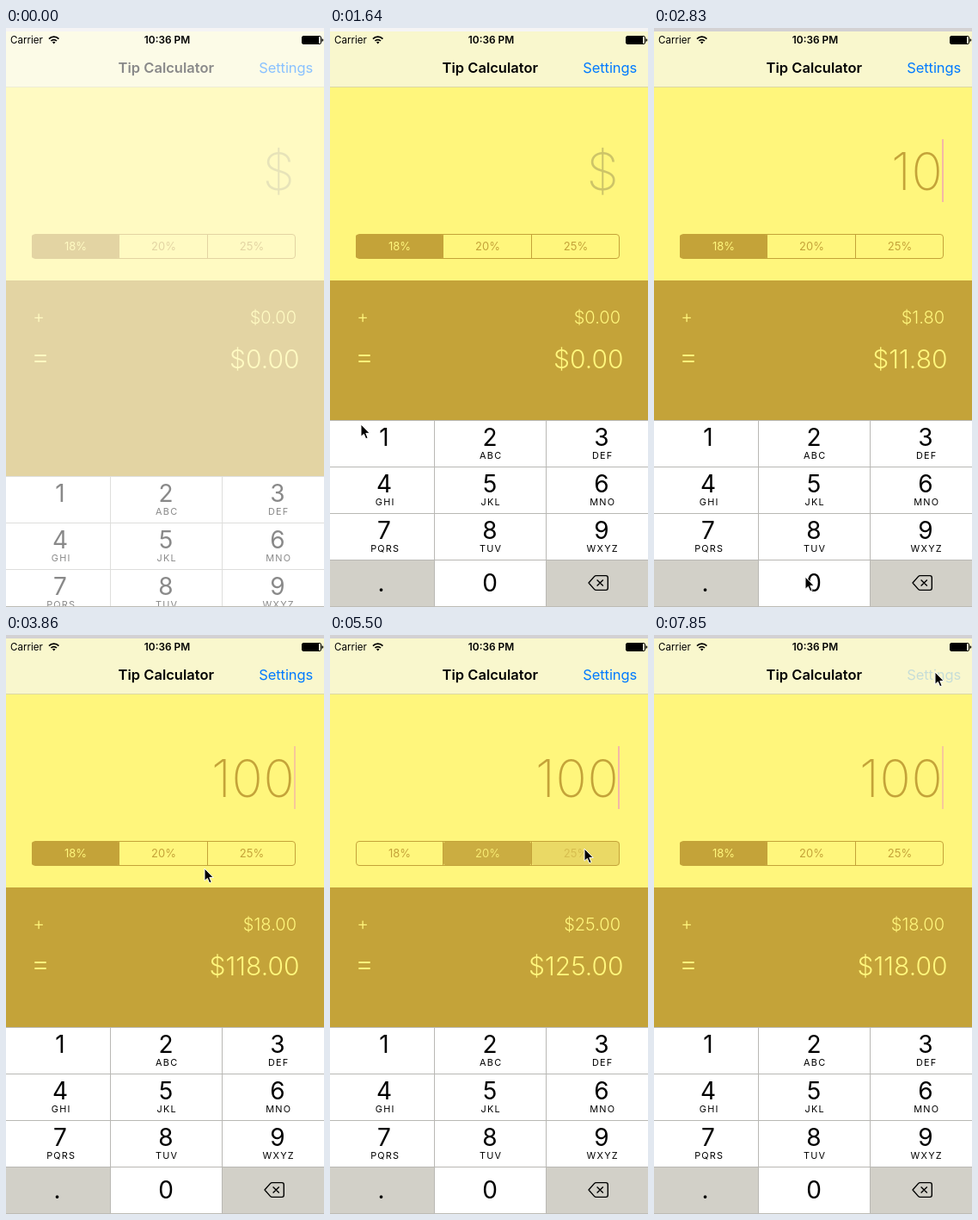
Animation, 370 px wide and 672 px high, one loop 8000 ms. Source, as an HTML page:

```html
<!DOCTYPE html>
<html lang="en">
<head>
<meta charset="utf-8">
<title>Tip Calculator</title>
<style>
  html, body { margin: 0; width: 100%; height: 100%; overflow: hidden; background: #fff; }
  svg { display: block; width: 370px; height: 672px; font-family: Inter, Roboto, "Liberation Sans", sans-serif; }
</style>
</head>
<body>
<svg viewBox="0 0 370 672">
  <g id="app">
    <rect y="4" width="370" height="64" fill="#f9f7cd"/>
    <rect y="68" width="370" height="1" fill="#dcd8a4"/>
    <rect y="69" width="370" height="224" fill="#fff67c"/>
    <rect y="293" width="370" height="379" fill="#c4a339"/>
    <g id="labels"></g>
    <g id="segments"></g>
    <rect id="caret" x="335" y="129" width="2" height="73" fill="#f4b8a6"/>
    <g id="keypad"></g>
  </g>
  <rect y="671" width="370" height="1" fill="#bdbbb5"/>
  <rect id="chrome" width="370" height="4"/>
  <g id="status">
    <g fill="none" stroke="#000" stroke-width="1.7">
      <path d="M50 12.6a7.6 7.6 0 0 1 11.4 0"/>
      <path d="M52.4 15a4.6 4.6 0 0 1 6.6 0"/>
    </g>
    <path d="M53.9 16.6a2.6 2.6 0 0 1 3.6 0L55.7 18.6z"/>
    <rect x="344.5" y="9.5" width="22" height="9" rx="1.5" fill="none" stroke="#000"/>
    <rect x="345" y="10" width="19" height="8"/>
    <path d="M367.5 12.3a1.8 1.8 0 0 1 0 3.6z"/>
  </g>
  <path id="mouse" d="M0 0V14.2L3.4 11.4L5.7 16.8L8.1 15.7L5.8 10.4H10.2z" fill="#000" stroke="#fff"/>
</svg>
<script>
const TICK = 148, LOOP = 8000, LAST = 53 * TICK;
const BROWN = '#c4a339', YELLOW = '#fff67c', GRAY = '#d2d0c8';
const $ = id => document.getElementById(id);
const clamp = v => Math.max(0, Math.min(1, v));
const ease = v => v * v * (3 - 2 * v);
const money = v => '$' + v.toFixed(2);

function add(parent, tag, attrs, content = '') {
  const el = document.createElementNS('http://www.w3.org/2000/svg', tag);
  for (const name in attrs) el.setAttribute(name, attrs[name]);
  el.textContent = content;
  parent.appendChild(el);
  return el;
}

function text(parent, content, x, y, size, weight, fill, anchor = 'middle', spacing = 0) {
  return add(parent, 'text', {
    x, y, fill, 'font-size': size, 'font-weight': weight,
    'text-anchor': anchor, 'letter-spacing': spacing
  }, content);
}

// Status bar, navigation bar and amounts
text($('status'), 'Carrier', 5, 18.4, 11.6, 400, '#000', 'start');
text($('status'), '10:36 PM', 187.5, 18.4, 11.9, 600, '#000');
const labels = $('labels');
text(labels, 'Tip Calculator', 186.3, 52, 16.5, 600, '#000');
const settings = text(labels, 'Settings', 357.2, 52, 16.5, 400, '#007aff', 'end', -0.08);
const amount = text(labels, '$', 336.5, 188, 60, 150, BROWN, 'end', 0.7);
text(labels, '+', 38, 342, 21, 300, YELLOW);
text(labels, '=', 40, 393, 33, 300, YELLOW);
const tip = text(labels, '', 338, 343, 20, 300, YELLOW, 'end');
const total = text(labels, '', 341.5, 395, 30, 300, YELLOW, 'end');

// Segmented control
const segs = [18, 20, 25].map((rate, i) => {
  const x = Math.round(30 + 102.3 * i), mid = 81 + 102.5 * i, box = $('segments');
  const seg = {
    rate,
    fill: add(box, 'rect', { x, y: 240, width: 102, height: 27, rx: 2, fill: BROWN }),
    off: text(box, rate + '%', mid, 258, 13, 400, BROWN),
    on: text(box, rate + '%', mid, 258, 13, 400, YELLOW)
  };
  if (i) add(box, 'path', { d: `M${x - .5} 239.5v28`, stroke: BROWN });
  return seg;
});
add($('segments'), 'rect', {
  x: 30.5, y: 239.5, width: 306, height: 28, rx: 3.5, fill: 'none', stroke: BROWN
});

// Keypad, drawn from its own top edge
const keypad = $('keypad'), keyBack = {};
const edges = [0, 122, 252, 371], mids = [63, 186, 316];
const letters = ['', 'ABC', 'DEF', 'GHI', 'JKL', 'MNO', 'PQRS', 'TUV', 'WXYZ'];
add(keypad, 'rect', { width: 370, height: 230, fill: '#b9b8b4' });
[...'123456789.0<'].forEach((name, i) => {
  const col = i % 3, y = 54 * Math.floor(i / 3), x = edges[col], mid = mids[col];
  keyBack[name] = add(keypad, 'rect', {
    x, y: y + 1, width: edges[col + 1] - x - 1, height: 53, fill: '.<'.includes(name) ? GRAY : '#fff'
  });
  if (name === '<') {
    add(keypad, 'path', {
      d: 'M301 189L307.5 181.6Q308.4 180.6 309.8 180.6H321Q323.3 180.6 323.3 182.9V195.1Q323.3 197.4 321 197.4H309.8Q308.4 197.4 307.5 196.4ZM310.6 185.4L317.8 192.6M317.8 185.4L310.6 192.6',
      fill: 'none', stroke: '#000', 'stroke-width': 1.4, 'stroke-linejoin': 'round'
    });
    return;
  }
  text(keypad, name, name === '.' ? 59.5 : mid, y + (i < 9 ? 30 : 37), 28, 400, '#000');
  if (letters[i]) text(keypad, letters[i], mid + 1.2, y + 45, 10.9, 400, '#000', 'middle', 1.2);
});

// What the user does, in ms
const taps = [{ key: '1', at: 2072 }, { key: '0', at: 2812 }, { key: '0', at: 3404 }];
const picks = [{ seg: 0, at: -LOOP }, { seg: 1, at: 4440 }, { seg: 2, at: 5476 }, { seg: 0, at: 6808 }];
const stops = [
  { x: -40, y: 470, from: 0, to: 0 },
  { x: 36, y: 460, from: 1180, to: 1628 },
  { x: 176, y: 637, from: 2220, to: 2664 },
  { x: 231, y: 271, from: 3404, to: 3848 },
  { x: 186, y: 251, from: 3848, to: 4292 },
  { x: 296, y: 248, from: 4736, to: 5180 },
  { x: 86, y: 250, from: 5772, to: 6512 },
  { x: 327, y: 43, from: 6956, to: 7548 }
];

function mouseAt(t) {
  let { x, y } = stops[0];
  for (const s of stops) {
    const k = s.to > s.from ? ease(clamp((t - s.from) / (s.to - s.from))) : 1;
    x += (s.x - x) * k;
    y += (s.y - y) * k;
  }
  return [x, y];
}

// The caret blinks once a second, counted from the latest key
function caretAt(t, since) {
  if (t < since) return 0;
  const p = (t - since) % 1000;
  return Math.max(clamp((560 - p) / 160), clamp((p - 850) / 150));
}

function paintSegments(t, done) {
  const now = done[done.length - 1], before = done[done.length - 2];
  const fading = t - now.at < TICK;
  segs.forEach((s, i) => {
    let fill = i === now.seg ? 1 : 0, on = fill, off = 1 - fill;
    if (fading && i === now.seg) { fill = .35; on = 0; off = .5; }
    if (fading && i === before.seg) { fill = .88; on = .85; off = 0; }
    s.fill.setAttribute('opacity', fill);
    s.on.setAttribute('opacity', on);
    s.off.setAttribute('opacity', off);
  });
  return segs[now.seg].rate;
}

function paint(t) {
  const typed = taps.filter(p => p.at <= t);
  const value = typed.map(p => p.key).join('');
  const since = typed.length ? typed[typed.length - 1].at : 50;
  const held = taps.find(p => t < p.at && t >= p.at - TICK);
  const bill = Number(value);
  const extra = bill * paintSegments(t, picks.filter(p => p.at <= t)) / 100;

  $('app').setAttribute('opacity', t < TICK ? .46 : 1);
  keypad.setAttribute('transform', `translate(0 ${455 + 65 * Math.exp(-t / 53)})`);
  $('caret').setAttribute('opacity', caretAt(t, since));
  $('mouse').setAttribute('transform', `translate(${mouseAt(t)})`);
  $('chrome').setAttribute('fill', t < taps[0].at - TICK ? '#f5f4f5' : '#d3d1d3');

  amount.textContent = value || '$';
  amount.setAttribute('fill', value ? BROWN : '#cdc468');
  tip.textContent = money(extra);
  total.textContent = money(bill + extra);
  settings.setAttribute('opacity', t >= LAST ? .2 : 1);
  for (const name of '01') {
    keyBack[name].setAttribute('fill', held && held.key === name ? GRAY : '#fff');
  }
}

const start = performance.now();
function run() {
  const t = (performance.now() - start) % LOOP;
  paint(Math.min(LAST, Math.floor(t / TICK) * TICK));
  requestAnimationFrame(run);
}
paint(0);
requestAnimationFrame(run);
</script>
</body>
</html>
```
